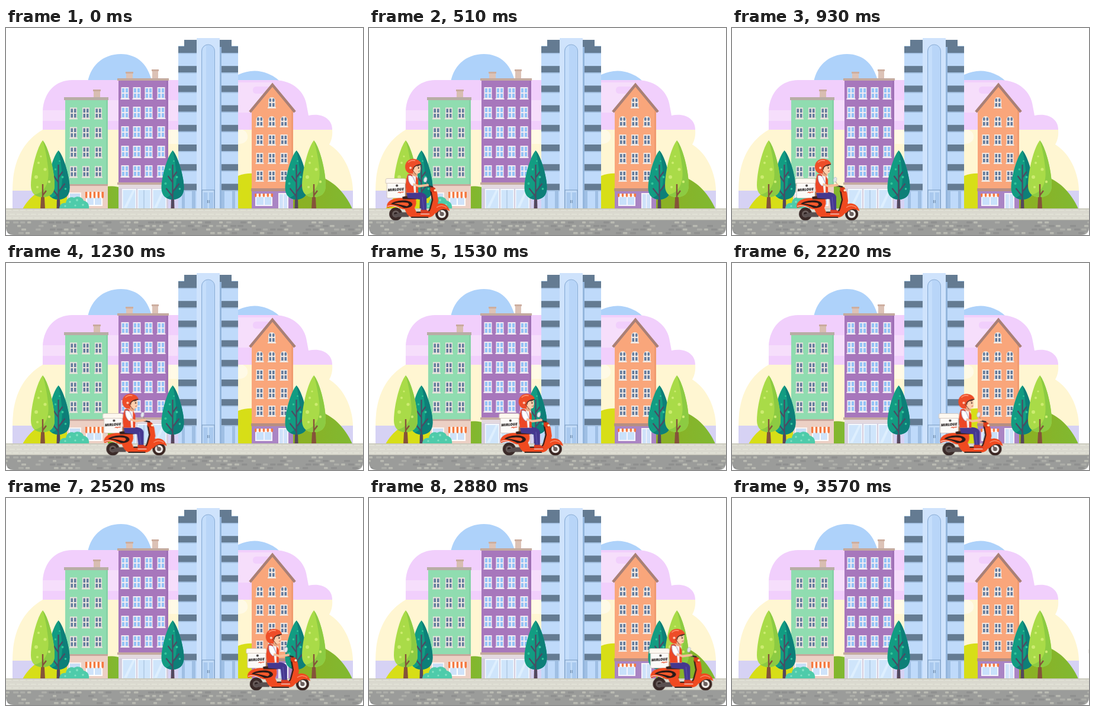
Animation of 603 by 350 pixels, one loop 4.6 s. Source, as an HTML page:

```html
<!DOCTYPE html>
<html lang="fr">
<head>
<meta charset="utf-8">
<title>Livraison en ville</title>
<style>
html, body { margin: 0; width: 100%; height: 100%; overflow: hidden; background: #fff; }
svg { display: block; width: 603px; height: 350px; }
#rider { animation: ride 4600ms infinite; }
/* one jump every 30 ms while the scooter crosses */
@keyframes ride {
  0% { transform: translate(-300px, 314.5px); animation-timing-function: step-end; }
  0.65217% { transform: translate(-45px, 314.5px); animation-timing-function: steps(118, end); }
  77.6087%, 100% { transform: translate(620px, 314.5px); }
}
</style>
</head>
<body>
<svg id="stage" viewBox="0 0 603 350" xmlns="http://www.w3.org/2000/svg">
  <defs>
    <clipPath id="road"><path d="M0 325H603V338Q602 350 590 350H13Q1 350 0 338Z"/></clipPath>
    <linearGradient id="hill" x2="1"><stop stop-color="#8fae1f"/><stop offset="1" stop-color="#80b932"/></linearGradient>
    <g id="lightTree">
      <path d="M-1.500 70H1.500L4 116H-4Z" fill="#85533a"/>
      <path d="M0 0C10 12 20 52 20 76C20 90 12 96 0 96S-20 90-20 76C-20 52-10 12 0 0Z" fill="#a9db48"/>
      <path d="M0 0C10 12 20 52 20 76C20 90 12 96 0 96C-6 96-11 94-14 92C4 88 12 72 9 46C7 26 3 10 0 0Z" fill="#8ccb42"/>
      <path d="M0 74V110M0 93L6 85" stroke="#85533a" stroke-width="2.400" fill="none"/>
      <g fill="#cdec70"><circle cx="-7" cy="38" r="2"/><circle cx="4" cy="49" r="2.600"/><circle cx="-11" cy="62" r="3"/><circle cx="-3" cy="27" r="1.600"/><circle cx="11" cy="70" r="2.200"/><circle cx="-9" cy="79" r="2"/></g>
    </g>
    <g id="darkTree">
      <path d="M-2 60H2L3 99H-3Z" fill="#5a4558"/>
      <path d="M0 0C9 10 19 44 19 63C19 77 11 83 0 83S-19 77-19 63C-19 44-9 10 0 0Z" fill="#129c82"/>
      <path d="M0 0C9 10 19 44 19 63C19 77 11 83 0 83C-4 83-8 82-11 80C3 74 8 60 6 40C5 22 2 8 0 0Z" fill="#0d7f78"/>
      <path d="M0 24V95M0 70L11 56M0 78L-11 64M0 54L-8 43M0 46L7 36" stroke="#4d4a63" stroke-width="2.200" fill="none"/>
      <g fill="#35c79c"><circle cx="-5" cy="32" r="1.800"/><circle cx="7" cy="45" r="2"/><circle cx="-12" cy="56" r="2.100"/><circle cx="12" cy="65" r="1.800"/><circle cx="2" cy="18" r="1.300"/></g>
    </g>
  </defs>

  <g id="sky">
    <path d="M137 98C140 64 164 44 194 44C222 44 242 62 248 98Z" fill="#aed2fa"/>
    <path d="M382 100V79H392Q418 67 442 77Q460 84 467 97V100Z" fill="#aed2fa"/>
    <path d="M62 172V140C64 108 84 88 112 88H455C485 89 505 108 508 132L511 148C535 143 552 155 551 173Z" fill="#f1cffc"/>
    <path d="M100 122H420V143H290V157H62V139H100ZM392 92H450V143H392Z" fill="#f6defb"/>
    <path d="M470 99H423Q417 99 417 105T423 111H470Z" fill="#f1cffc"/>
    <path d="M62 172H551C552 184 549 192 546 197C569 211 585 241 586 275H11C11 226 28 192 62 172Z" fill="#fff6d2"/>
    <path d="M275 172H400Q410 177 408 187Q405 196 392 196H275Z" fill="#fffae6"/>
    <path d="M11 275H586V306H11Z" fill="#d6d2f4"/>
    <path d="M28 306C40 284 58 272 80 270C100 270 118 285 126 306Z" fill="#d7de17"/>
    <path d="M130 306C138 276 160 263 190 269V306Z" fill="url(#hill)"/>
    <path d="M392 250Q405 245 420 246V306H392Z" fill="#d7de17"/>
    <path d="M470 306V264C482 250 498 246 513 247C547 251 572 276 585 306Z" fill="url(#hill)"/>
  </g>
  <g id="town"></g>
  <g id="trees">
    <use href="#darkTree" x="88.500" y="207"/><use href="#lightTree" x="62" y="190"/>
    <use href="#darkTree" x="281.500" y="207"/>
    <use href="#darkTree" x="490.500" y="207"/><use href="#lightTree" x="520" y="190"/>
    <path d="M90 306C90 299 95 295 101 296C102 288 109 284 115 287C122 283 130 287 131 292C138 293 141 299 140 306Z" fill="#4ecbaa"/>
    <g fill="#84e2c4"><circle cx="108" cy="294" r="1.700"/><circle cx="120" cy="291" r="1.900"/><circle cx="117" cy="300" r="1.600"/><circle cx="130" cy="299" r="1.800"/><circle cx="100" cy="301" r="1.600"/></g>
  </g>
  <g id="street"></g>

  <g id="rider">
    <!-- delivery box -->
    <path d="M4-29H37V-25H4ZM16-38H29V-30H16Z" fill="#a5673f"/>
    <rect x="-15" y="-54" width="31" height="27" rx="2" fill="#fcfaf8" stroke="#c9bcb3" stroke-width=".8"/>
    <path d="M-17-58Q-17-60-14-60H14Q17-60 17-58V-52H-17Z" fill="#fdf8f0" stroke="#cdbfb4" stroke-width=".8"/>
    <circle cx="2" cy="-48" r="2" fill="#4a4543"/>
    <g transform="rotate(-4)" font-family="'Open Sans', 'DejaVu Sans', sans-serif" font-weight="800" font-style="italic">
      <text x="3" y="-39" text-anchor="middle" font-size="6.200" fill="#1c1717">MIRLOUE</text>
      <text x="11" y="-35" text-anchor="middle" font-size="3.800" fill="#e8401c">repas</text>
    </g>
    <!-- scooter -->
    <circle r="11" fill="#3a2a28"/><circle r="6" fill="#6b5f5d"/><circle r="3" fill="#2c2020"/>
    <path d="M-4 1L10-3H22V5H2Q-4 5-4 1Z" fill="#5a5050"/>
    <circle cx="78" r="11" fill="#3a2622"/><circle cx="78" r="6.800" fill="#f6f2ef"/><circle cx="78" r="3.600" fill="#6b5f5d"/>
    <path d="M66-28L76-2" stroke="#6f6260" stroke-width="2.600"/>
    <path d="M14-12L31-12L35-3H51Q56-4 58-11L61-24L58-42L66-44L70-36L72-22L67-3Q64 5 55 6H27Q18 3 14-12Z" fill="#f04a20"/>
    <path d="M59-40L62-24L58-9Q56-3 50-3H35" stroke="#2b1a18" stroke-width="2.200" fill="none"/>
    <path d="M26 5.500H55" stroke="#3a2520" stroke-width="2"/>
    <path d="M-15-13C-15-22-6-26 6-27H33Q37-18 31-9L12-8Q-4-16-14-10Z" fill="#f04a20"/>
    <path d="M-8-17C-3-22 6-23 16-23Q29-21 28-15Q25-10 14-10Q6-15-8-17Z" fill="#2b1a18"/>
    <path d="M-3-18Q10-21 20-19Q25-16 19-13Q12-15-3-18Z" fill="#f4592c"/>
    <path d="M-14-13Q-4-16 6-10" stroke="#fff" stroke-width="1" fill="none"/>
    <path d="M64-9C67-17 76-21 85-15Q90-11 91-5Q78-13 69-2L64 0Z" fill="#f04a20"/>
    <path d="M69-11Q77-17 86-11" stroke="#ffb091" stroke-width="1" fill="none"/>
    <path d="M58-45Q66-48 68-40L66-36L59-38Z" fill="#d93a18"/>
    <circle cx="66.500" cy="-40" r="2" fill="#fff1c7"/>
    <path d="M51-48L62-46" stroke="#3a2d2d" stroke-width="2.500" stroke-linecap="round"/>
    <path d="M56-46L51-55" stroke="#8c8583" stroke-width="1"/>
    <ellipse cx="50" cy="-58" rx="2.700" ry="4.300" transform="rotate(15 50 -58)" fill="#e4e7ee" stroke="#b3b8c4" stroke-width=".7"/>
    <!-- person -->
    <path d="M11-29Q22-32 36-28L35-25H12Z" fill="#39211e"/>
    <path d="M18-37H36Q50-37 52-29L52-6H43L41-25L20-27Z" fill="#45388f"/>
    <path d="M45-29L47-8" stroke="#655bb5" stroke-width="1" fill="none"/>
    <path d="M42-7H52L58-3Q59 0 56 0H42Z" fill="#d93f24"/><path d="M42 0H57" stroke="#fff" stroke-width="1"/>
    <path d="M20-67Q30-70 37-64L38-36H18Q15-54 20-67Z" fill="#f6f2f0"/>
    <path d="M20-67Q26-69 28-66L31-36H18Q15-54 20-67Z" fill="#ec4726"/>
    <path d="M34-65L38-58V-36H34Z" fill="#ec4726"/>
    <path d="M21-65Q28-67 31-58L34-51L28-47Q20-53 21-65Z" fill="#fff" stroke="#75679f" stroke-width=".7"/>
    <path d="M31-50L39-47L54-49" stroke="#f7be98" stroke-width="4" stroke-linejoin="round" stroke-linecap="round" fill="none"/>
    <path d="M28-72H37V-65Q32-62 28-66Z" fill="#eaa77e"/>
    <path d="M27-84H41L42-77L41-70Q36-66 29-70Z" fill="#ffcfac"/>
    <path d="M36-81L40-82" stroke="#3b2520" stroke-width="1.200"/><ellipse cx="38.500" cy="-78" rx=".9" ry="1.500" fill="#3b2520"/>
    <path d="M38-72L41-73" stroke="#b85343" stroke-width=".9"/>
    <path d="M29-68C20-67 15-74 16-82C18-91 25-94 32-93C39-92 43-88 43-84L34-82Q28-79 30-73Z" fill="#ee4d28"/>
    <path d="M21-87Q26-92 33-90" stroke="#ff9270" stroke-width="1.600" fill="none"/>
    <path d="M30-75Q29-82 43-84" stroke="#4a2520" stroke-width="1.500" fill="none"/>
    <circle cx="25" cy="-78" r="2" fill="#ffd2bc"/>
    <path d="M27-76L34-67" stroke="#6c2d22" stroke-width="1"/>
  </g>
</svg>
<script>
const rect = (x, y, w, h, fill, extra = '') =>
  `<rect x="${x}" y="${y}" width="${w}" height="${h}" fill="${fill}" ${extra}/>`;
const path = (d, fill, extra = '') => `<path d="${d}" fill="${fill}" ${extra}/>`;

// sash window centred on cx, cy
function sash(cx, cy, w, h, glass, frame, arch) {
  const x = cx - w / 2, y = cy - h / 2;
  const body = arch
    ? path(`M${x} ${y + h}V${y + w / 2}A${w / 2} ${w / 2} 0 0 1 ${x + w} ${y + w / 2}V${y + h}Z`, frame)
    : rect(x, y, w, h, frame);
  const pw = (w - 5) / 2, ph = (h - 6) / 2;
  let out = body;
  for (const px of [x + 1.5, cx + 1])
    for (const py of [y + 2, cy + 1])
      out += rect(px, py, pw, ph, glass, arch && py < cy ? 'rx="2"' : '');
  return out + rect(x - 1, y + h - 1, w + 2, 2, frame);
}
const sashes = (xs, ys, ...style) =>
  ys.map(y => xs.map(x => sash(x, y, ...style)).join('')).join('');

function awning(x, y, w, h, n) {
  let out = '';
  const s = w / n;
  for (let i = 0; i < n; i++) {
    const fill = i % 2 ? '#fff3ea' : '#f5783f', l = x + i * s;
    out += path(`M${l} ${y}h${s}v${h - 2}q${-s / 2} 4 ${-s} 0Z`, fill);
  }
  return out;
}

function greenHouse() {
  return rect(148, 105, 11, 13, '#d8bdb1') + rect(147, 104, 13, 3, '#c9aa9d') +
    rect(100, 120, 72, 146, '#90dcb0') + rect(169, 122, 3, 144, '#86d2a7') +
    rect(98, 117, 75, 5, '#b8ada5') +
    sashes([114, 135, 156], [144, 177, 210, 243], 12, 19, '#637b9c', '#e9e4de') +
    rect(103, 265, 69, 41, '#ecd0c4') + rect(100, 264, 72, 3, '#c7a79b') +
    rect(106, 278, 21, 26, '#f8f4f2') + rect(108, 280, 17, 24, '#c7def7') +
    rect(135, 284, 28, 17, '#fff') + rect(137, 286, 11, 13, '#cfe3fa') + rect(150, 286, 11, 13, '#cfe3fa') +
    awning(134, 277, 31, 11, 9);
}

function purpleHouse() {
  let out = rect(203, 75, 11, 11, '#dcc2b6') + rect(202, 74, 13, 3, '#cdae9f') +
    rect(247, 71, 10, 15, '#dcc2b6') + rect(246, 70, 12, 3, '#cdae9f') +
    rect(190, 88, 84, 176, '#a777bc') + rect(271, 89, 3, 174, '#9f70b5') +
    rect(188, 85, 87, 4, '#c4aaa0') +
    sashes([201, 221, 241, 262], [110, 143, 176, 209, 242], 13, 20, '#94c3f6', '#f0eaf3') +
    rect(190, 263, 84, 43, '#d5cddd') + rect(188, 261, 87, 4, '#c4aaa0') +
    rect(190, 265, 84, 6, '#e3d9df');
  for (const [x, w] of [[196, 24], [222, 23], [247, 24]])
    out += rect(x, 272, w, 33, '#f5f9fe') + rect(x + 1.5, 274, w - 3, 31, '#cfe5fb');
  return out + path('M199 304L214 274H218L204 304ZM250 304L264 274H268L255 304Z', '#deeffe') +
    path('M233 274V305', 'none', 'stroke="#9eb9d8"');
}

function tower() {
  const band = (x, y, w) => rect(x, y, w, 11, '#647b92') + rect(x, y + 11, w, 1.5, '#9dbbdc');
  let out = rect(291, 30, 101, 276, '#bfdafa') + rect(301, 20, 80, 11, '#647b92');
  for (let i = 0; i < 8; i++)
    out += band(291, 31 + i * 33.2, 31) + band(361, 31 + i * 33.2, 31);
  return out + rect(297, 276, 5, 30, '#9fbfe4') + rect(314, 276, 6, 30, '#9fbfe4') +
    rect(364, 276, 5, 30, '#9fbfe4') + rect(382, 276, 5, 30, '#9fbfe4') +
    rect(361, 32, 3, 274, '#94b6dd') + rect(322, 17, 39, 289, '#cfe3fc') +
    path('M330.500 306V39A11 11 0 0 1 352.500 39V306Z', '#b8d5f8', 'stroke="#8badd5"') +
    path('M332 275V39A10 10 0 0 1 338 30V275Z', '#c5defb') +
    rect(331, 274, 21, 32, '#c3dcf8', 'stroke="#7899c0"') +
    rect(333.500, 278, 7, 28, '#a9c9ee') + rect(343, 278, 7, 28, '#a9c9ee') +
    path('M340.500 291V296M343 291V296', 'none', 'stroke="#62809f"');
}

function orangeHouse() {
  const style = [12, 18, '#637b9c', '#f0e8e3'];
  return path('M415 273V139L450 96L485 139V273Z', '#f9a67b') +
    rect(482, 139, 3, 134, '#f09b70') +
    path('M412 142L450 96L488 142', 'none', 'stroke="#a98076" stroke-width="4.500"') +
    sash(449, 126, ...style, true) +
    sashes([428.500, 449, 469.500], [158], ...style, true) +
    sashes([428.500, 449, 469.500], [189, 220, 250], ...style) +
    rect(415, 274, 70, 32, '#aa85c4') + rect(414, 271, 72, 5, '#b68f83') +
    rect(421, 281, 29, 20, '#f6f4fc') + rect(423, 286, 12, 13, '#c9e1fb') + rect(437, 286, 11, 13, '#c9e1fb') +
    awning(420, 280, 31, 6, 9) +
    rect(460, 279, 17, 27, '#f7f2fa') + rect(462, 281, 13, 24, '#cfe2fa') +
    path('M468.500 281V305', 'none', 'stroke="#f7f2fa" stroke-width="1.500"');
}

function street() {
  let seed = 11;
  const rnd = () => (seed = seed * 16807 % 2147483647) / 2147483647;
  let out = rect(0, 305, 603, 20, '#dad9cf') + rect(0, 305, 603, 1.5, '#c7c6b8');
  for (const [y, shift] of [[308, 0], [315, 6], [321, 0]])
    out += path(`M${-shift} ${y}H603`, 'none', 'stroke="#eae9de" stroke-width="1.200" stroke-dasharray="9 3"');
  out += rect(0, 324, 603, 1.5, '#b9b9ae') + '<g clip-path="url(#road)">' + rect(0, 325, 603, 25, '#9b9c9a');
  for (let row = 0; row < 4; row++)
    for (let x = -row * 5 % 12; x < 603; x += 12) {
      const r = rnd();
      if (r < .6) out += rect(x, 327 + row * 6, 6 + r * 7, 3.5, r < .3 ? '#b9bab2' : r < .45 ? '#acada8' : '#8f908f', 'rx="1"');
    }
  return out + '</g>';
}

const fill = (id, markup) => { document.getElementById(id).innerHTML = markup; };
fill('town', greenHouse() + purpleHouse() + tower() + orangeHouse());
fill('street', street());
</script>
</body>
</html>
```
